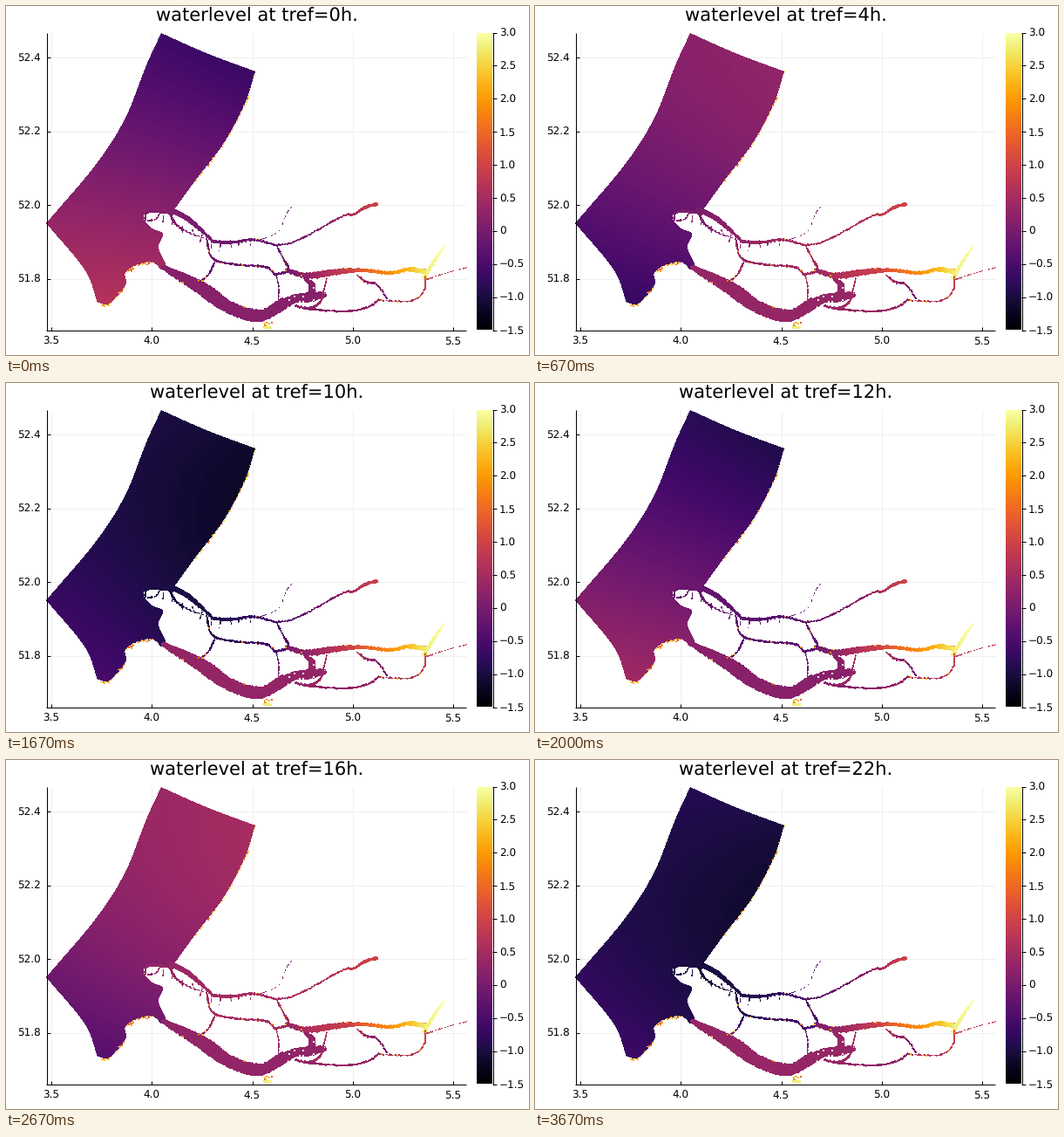
These frames come from a looping animation (600x400 px, 4010 ms). A matplotlib script:

```python
import numpy as np
import matplotlib.pyplot as plt
from matplotlib.animation import FuncAnimation
from matplotlib.path import Path

W, H = 600, 400
STEPS, FRAMES, FRAME_MS = 12, 401, 10
TIDE_DEG = 360 / 12.42  # degrees of the main tide per hour
PX = 0.72  # points per pixel at 100 dpi
VMIN, VMAX = -1.5, 3.0
rng = np.random.default_rng(7)
plt.rcParams["font.family"] = "DejaVu Sans"
plt.rcParams["text.hinting"] = "none"

# Each wet pixel holds mean, tide amplitude and phase, overtide amplitude and phase.
Y, X = np.mgrid[0:H, 0:W] + 0.5
water = np.full((H, W, 5), np.nan)
HARBOUR = np.array([-.3, .95, 57, .3, 110])
INNER = np.array([0, .5, 110, 0, 110])
SOUTH = np.array([.3, .15, 200, 0, 110])
WEST = 0.7 * HARBOUR + 0.3 * INNER


def still(level):
    return np.array([level, 0, 110, 0, 110])


def tide_level(tide, hour):
    mean, amp, phase, amp2, phase2 = tide.T
    angle = TIDE_DEG * hour
    return (mean + amp * np.cos(np.radians(angle - phase))
            + amp2 * np.cos(np.radians(2 * angle - phase2)))


def sea_tide(x, y):
    """The tide weakens and comes later towards the north."""
    u, v = (x - 165) / 120, (y - 185) / 155
    return np.stack([np.full_like(u, -.37), .9 + .25 * v + .08 * u,
                     58 - 33 * v + 12 * u, .33 + .07 * u, 115 - 20 * v], -1)


def curve(points, n=32):
    """Smooth Catmull-Rom path through a few key points."""
    p = np.array(points, float)
    p = np.vstack([2 * p[0] - p[1], p, 2 * p[-1] - p[-2]])
    t = np.linspace(0, 1, n)[:, None]
    spans = [b + t / 2 * (c - a + t * (2 * a - 5 * b + 4 * c - d
                                       + t * (3 * (b - c) + d - a)))
             for a, b, c, d in zip(p, p[1:], p[2:], p[3:])]
    return np.vstack(spans)


def blocks():
    """Uniform noise in cells of two by two pixels."""
    return np.kron(rng.random((H // 2, W // 2)), np.ones((2, 2)))


def river(points, width, start, end, dry=0.0, keep=1.0):
    """Paint a ragged stream whose width and tide vary along its path."""
    path = curve(points)
    x0, y0 = path.min(axis=0).astype(int) - 12
    x1, y1 = path.max(axis=0).astype(int) + 13
    box = np.s_[y0:y1, x0:x1]
    d = np.hypot(X[box][..., None] - path[:, 0], Y[box][..., None] - path[:, 1])
    t = d.argmin(axis=-1) / (len(path) - 1)
    half = np.interp(t, np.linspace(0, 1, len(width)), width) / 2
    wet = d.min(axis=-1) < half + blocks()[box] - 0.5
    wet &= blocks()[box] < keep
    water[box][wet] = start + (end - start) * t[wet][:, None]
    water[box][wet & (blocks()[box] < dry)] = still(rng.uniform(1.3, 2.4))


def specks(points, count, low=1.3, high=3.0, spread=0.6):
    """Scatter small cells that keep a high level along a path."""
    path = curve(points)
    for x, y in path[rng.integers(len(path), size=count)]:
        x, y = (np.array([x, y]) + rng.normal(0, spread, 2)).astype(int)
        water[y:y + rng.integers(1, 3), x:x + 2] = still(rng.uniform(low, high))


# Sea
NORTH = [(178, 31), (230, 54), (286, 75)]
EAST = [(286, 75), (274, 112), (250, 157), (218, 199), (194, 232)]
MAASMOND = [(188, 236), (164, 235), (158, 244), (168, 255), (180, 261),
            (175, 277), (183, 296), (178, 302)]
DELTA = [(178, 302), (168, 294), (150, 297), (137, 306), (137, 320),
         (119, 341), (105, 340)]
WESTERN = [(105, 340), (90, 302), (46, 249)]
OFFSHORE = [(46, 249), (102, 183), (136, 130), (161, 68), (178, 31)]
outline = np.vstack([curve(e) for e in
                     (NORTH, EAST, MAASMOND, DELTA, WESTERN, OFFSHORE)])
grid = np.column_stack([X.ravel(), Y.ravel()])
sea = Path(outline).contains_points(grid).reshape(H, W)
water[sea] = sea_tide(X[sea], Y[sea])

# Southern basin
river([(181, 300), (222, 322), (256, 345), (291, 355), (318, 341)],
      (6, 13, 17, 14, 15, 13, 13), SOUTH, SOUTH, dry=0.004)
river([(312, 346), (330, 336), (347, 334), (364, 331)], (12, 10, 12, 8),
      SOUTH, SOUTH, keep=0.93)
river([(343, 311), (351, 320), (350, 332)], (6, 9), SOUTH, SOUTH, keep=0.95)
river([(332, 344), (348, 346), (361, 338), (369, 308)], (3, 3, 1),
      SOUTH, still(.5))

# Harbour and northern rivers
river([(159, 247), (163, 236), (190, 237)], (2, 4), HARBOUR, HARBOUR)
river([(163, 246), (172, 244), (178, 236)], (2, 1), HARBOUR, HARBOUR)
river([(188, 237), (195, 250), (212, 261), (228, 266)], (4, 2, 1),
      HARBOUR, HARBOUR)
river([(188, 233), (210, 245), (238, 270)], (6, 6, 3), HARBOUR, WEST)
river([(238, 270), (260, 271), (284, 268), (310, 274)], (4, 2.5), WEST, INNER,
      dry=0.01)
for x in range(181, 282, 11):
    y = np.interp(x, [181, 238, 282], [238, 270, 268])
    river([(x, y), (x + rng.uniform(-3, 3), y + rng.uniform(6, 11))], (1.5, 1),
          WEST, WEST)
river([(292, 268), (313, 258), (322, 238), (331, 226)], (.6, .2),
      INNER, still(-.2))
river([(310, 274), (329, 271), (355, 258), (376, 246), (391, 239), (399, 239),
       (412, 231), (425, 227)], (2, 2, 4), INNER, still(1), dry=0.005)
river([(230, 266), (237, 289), (262, 296), (297, 299), (309, 308)], (2, 3),
      WEST, INNER, dry=0.03)
river([(310, 274), (319, 291), (324, 303), (309, 308)], (2, 3),
      INNER, INNER, dry=0.03)
river([(310, 308), (313, 325), (311, 346)], (1.5, 1.5), INNER, SOUTH)
river([(240, 293), (232, 308), (222, 317)], (1.5, 3), WEST, SOUTH, dry=0.1)

# Eastern rivers
river([(322, 303), (345, 309), (370, 306), (395, 303)], (5, 8, 6),
      0.4 * INNER + 0.6 * SOUTH, still(.95), dry=0.02)
river([(395, 303), (412, 303), (440, 306), (463, 302), (483, 305)], (5, 4, 6),
      still(.95), still(2.8), dry=0.04)
river([(480, 311), (492, 291), (503, 275)], (5, 4, 1.5), still(2.8), still(3))
river([(345, 347), (385, 350), (413, 346), (428, 337)], (2.5, 2.5),
      SOUTH, still(.35))
river([(428, 337), (464, 338), (479, 327), (481, 310)], (2, 2),
      still(.4), still(1), dry=0.12)
river([(403, 308), (412, 316), (425, 319), (437, 335)], (2, 3, 2),
      still(.6), still(-.1), dry=0.12)
river([(481, 314), (505, 306), (528, 300)], (1.3, .8), still(.9), still(.8))

# Dry banks
specks(EAST[:-1], 30, spread=0.4)
specks(DELTA[1:4], 26)
specks(DELTA[4:], 14)
specks([(296, 368), (299, 363), (306, 362)], 16)
water[367:370, 296:305] = still(2.8)

# One picture of the water for each step
cmap = plt.get_cmap("inferno")
wet = ~np.isnan(water[..., 0])
pictures = np.zeros((STEPS, H, W, 4), np.uint8)
for step in range(STEPS):
    level = tide_level(water[wet], 2 * step)
    pictures[step][wet] = cmap((level - VMIN) / (VMAX - VMIN), bytes=True)

# Stage
fig = plt.figure(figsize=(W / 100, H / 100), dpi=100, facecolor="white")
ax = fig.add_axes([0, 0, 1, 1])
ax.axis("off")
LEFT, RIGHT, TOP, BOTTOM = 46.5, 528, 30.5, 371.5


def line(xs, ys, color="black", z=3):
    ax.plot(xs, ys, color=color, lw=PX, zorder=z, solid_capstyle="butt")


def label(x, middle, text, ha):
    ax.text(x, middle + 4.4, text, size=12 * PX, ha=ha, va="baseline")


for k in range(5):
    x = 52.1 + 115.2 * k
    line([x, x], [TOP, BOTTOM], "#efefef", 1)
    line([x, x], [BOTTOM, BOTTOM - 4])
    label(x - 0.3, 383.3, f"{3.5 + k / 2:.1f}", "center")
for k in range(4):
    y = 59.1 + 84.5 * k
    line([LEFT, RIGHT], [y, y], "#efefef", 1)
    line([LEFT, LEFT + 4], [y, y])
    label(39.4, y, f"{52.4 - k / 5:.1f}", "right")
line([LEFT, LEFT], [TOP, BOTTOM + 0.5])
line([LEFT - 0.5, RIGHT], [BOTTOM, BOTTOM])

ax.imshow(np.linspace(1, 0, 256)[:, None], cmap=cmap, aspect="auto",
          extent=(540, 558, 371, 31), interpolation="nearest", zorder=2)
line([558.5, 558.5], [TOP, BOTTOM])
for k in range(10):
    level = 3 - k / 2
    y = TOP + k * (BOTTOM - TOP) / 9
    line([558, 563], [y, y])
    text = f"{level:.1f}".replace("-", "\u2212") if level else "0"
    label(566, y, text, "left")

title = ax.text(288, 18, "", size=21 * PX, ha="center", va="baseline")
surface = ax.imshow(pictures[0], extent=(0, W, H, 0), aspect="auto",
                    interpolation="nearest", zorder=2)
ax.set_xlim(0, W)
ax.set_ylim(H, 0)


def update(i):
    # Three steps a second, rounded to the nearest frame.
    step = min(int((i + 0.5) * 3 * FRAME_MS / 1000), STEPS - 1)
    surface.set_data(pictures[step])
    title.set_text(f"waterlevel at tref={2 * step}h.")
    return surface, title


anim = FuncAnimation(fig, update, frames=FRAMES, interval=FRAME_MS,
                     repeat=True, repeat_delay=0)
plt.show()
```
